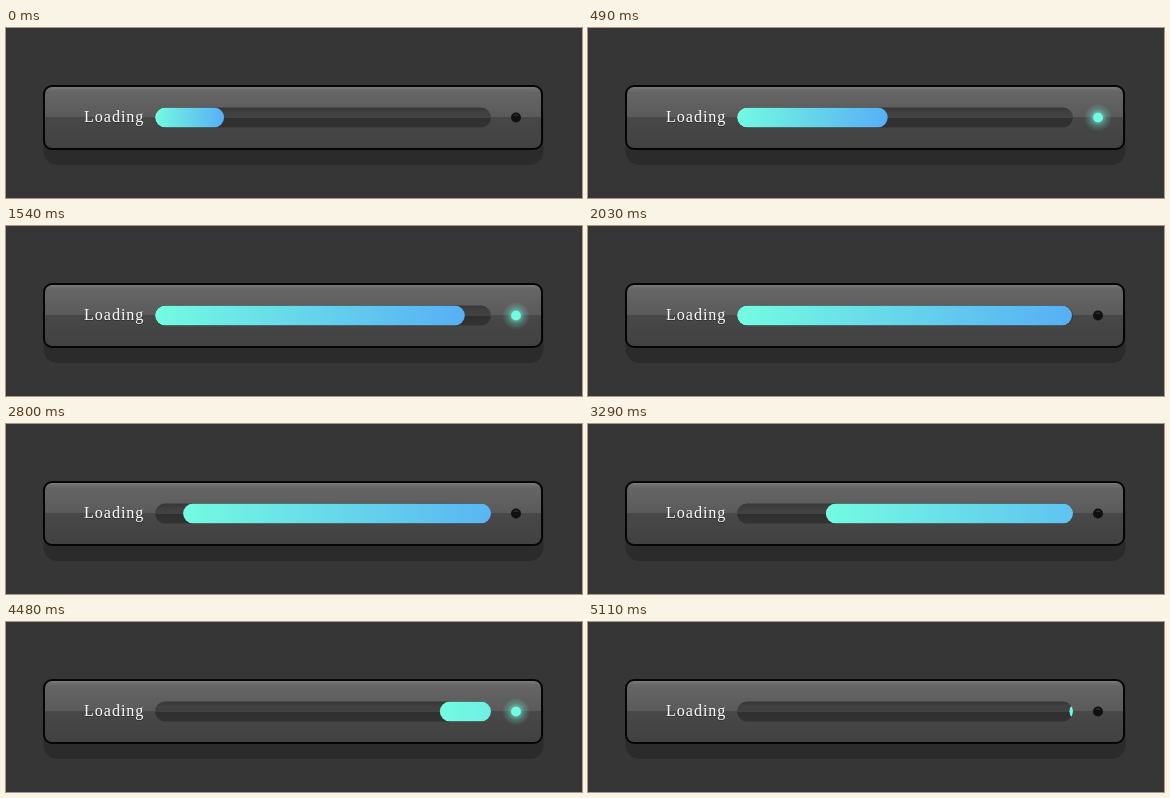
Animation of 576 by 170 pixels, one loop 5180 ms. Source, as an HTML page:

```html
<!DOCTYPE html>
<html lang="en">
<head>
<meta charset="utf-8">
<title>Loading bar</title>
<style>
html, body { margin: 0; width: 100%; height: 100%; overflow: hidden; background: #363636; }
svg { display: block; width: 100%; height: 100%; }
text { font: 16px "Liberation Serif", serif; letter-spacing: 1px; }
</style>
</head>
<body>
<svg viewBox="0 0 576 170">
  <defs>
    <linearGradient id="panel" x2="0" y2="1">
      <stop offset="0" stop-color="#747474"/>
      <stop offset=".1" stop-color="#656565"/>
      <stop offset=".5" stop-color="#5a5a5a"/>
      <stop offset=".5" stop-color="#484848"/>
      <stop offset="1" stop-color="#414141"/>
    </linearGradient>
    <linearGradient id="groove" x2="0" y2="1">
      <stop offset="0" stop-color="#363636"/>
      <stop offset=".25" stop-color="#404040"/>
      <stop offset=".5" stop-color="#424242"/>
      <stop offset=".5" stop-color="#2f2f2f"/>
      <stop offset="1" stop-color="#323232"/>
    </linearGradient>
    <linearGradient id="fill">
      <stop offset="0" stop-color="#73fbe1"/>
      <stop offset="1" stop-color="#57aff5"/>
    </linearGradient>
    <radialGradient id="halo">
      <stop offset=".3" stop-color="#6ef5e0" stop-opacity=".6"/>
      <stop offset=".6" stop-color="#6ef5e0" stop-opacity=".24"/>
      <stop offset="1" stop-color="#6ef5e0" stop-opacity="0"/>
    </radialGradient>
    <clipPath id="slot"><rect x="149" y="79.5" width="336" height="20" rx="10"/></clipPath>
  </defs>
  <rect width="576" height="170" fill="#363636"/>
  <rect x="37.5" y="74" width="500" height="63" rx="14" fill="#2b2b2b"/>
  <rect x="38" y="58" width="498" height="63" rx="8" fill="url(#panel)" stroke="#050505" stroke-width="2"/>
  <path d="M45 60H529" stroke="#858585" stroke-opacity=".6"/>
  <text x="78" y="95" fill="#000" fill-opacity=".35">Loading</text>
  <text x="78" y="94" fill="#fff">Loading</text>
  <rect x="149" y="79.5" width="336" height="20" rx="10" fill="url(#groove)"/>
  <g clip-path="url(#slot)">
    <rect id="bar" x="149" y="79.5" width="336" height="20" rx="10" fill="url(#fill)"/>
  </g>
  <circle cx="510" cy="89.5" r="5" fill="#101010"/>
  <path d="M507 88a3.4 3.4 0 0 1 6 0z" fill="#2a2a2a"/>
  <g id="lamp">
    <circle cx="510" cy="89.5" r="14" fill="url(#halo)"/>
    <circle cx="510" cy="89.5" r="5" fill="#73fbe1"/>
  </g>
</svg>
<script>
const LOOP = 5180, LEFT = 149, FULL = 336;
const GROW = { start: -985, span: 3140 };
const SLIDE = { start: 2155, span: 3190 };
const bar = document.getElementById('bar');
const lamp = document.getElementById('lamp');
const clamp = v => Math.min(1, Math.max(0, v));

// CSS ease-in-out: cubic-bezier(.42, 0, .58, 1)
function easeInOut(x) {
  let lo = 0, hi = 1;
  for (let i = 0; i < 24; i++) {
    const s = (lo + hi) / 2, r = 1 - s;
    const bx = 1.26 * r * r * s + 1.74 * r * s * s + s * s * s;
    if (bx < x) lo = s; else hi = s;
  }
  return lo * lo * (3 - 2 * lo);
}

const progress = (t, phase) => easeInOut(clamp((t - phase.start) / phase.span));

function glow(t) {
  const p = t % 1000;
  return clamp((p - 340) / 130) * clamp((750 - p) / 130);
}

function draw(t) {
  bar.setAttribute('width', FULL * progress(t, GROW));
  bar.setAttribute('x', LEFT + FULL * progress(t, SLIDE));
  lamp.setAttribute('opacity', glow(t));
}

const begin = performance.now();
function tick() {
  draw((performance.now() - begin) % LOOP);
  requestAnimationFrame(tick);
}
draw(0);
requestAnimationFrame(tick);
</script>
</body>
</html>
```
